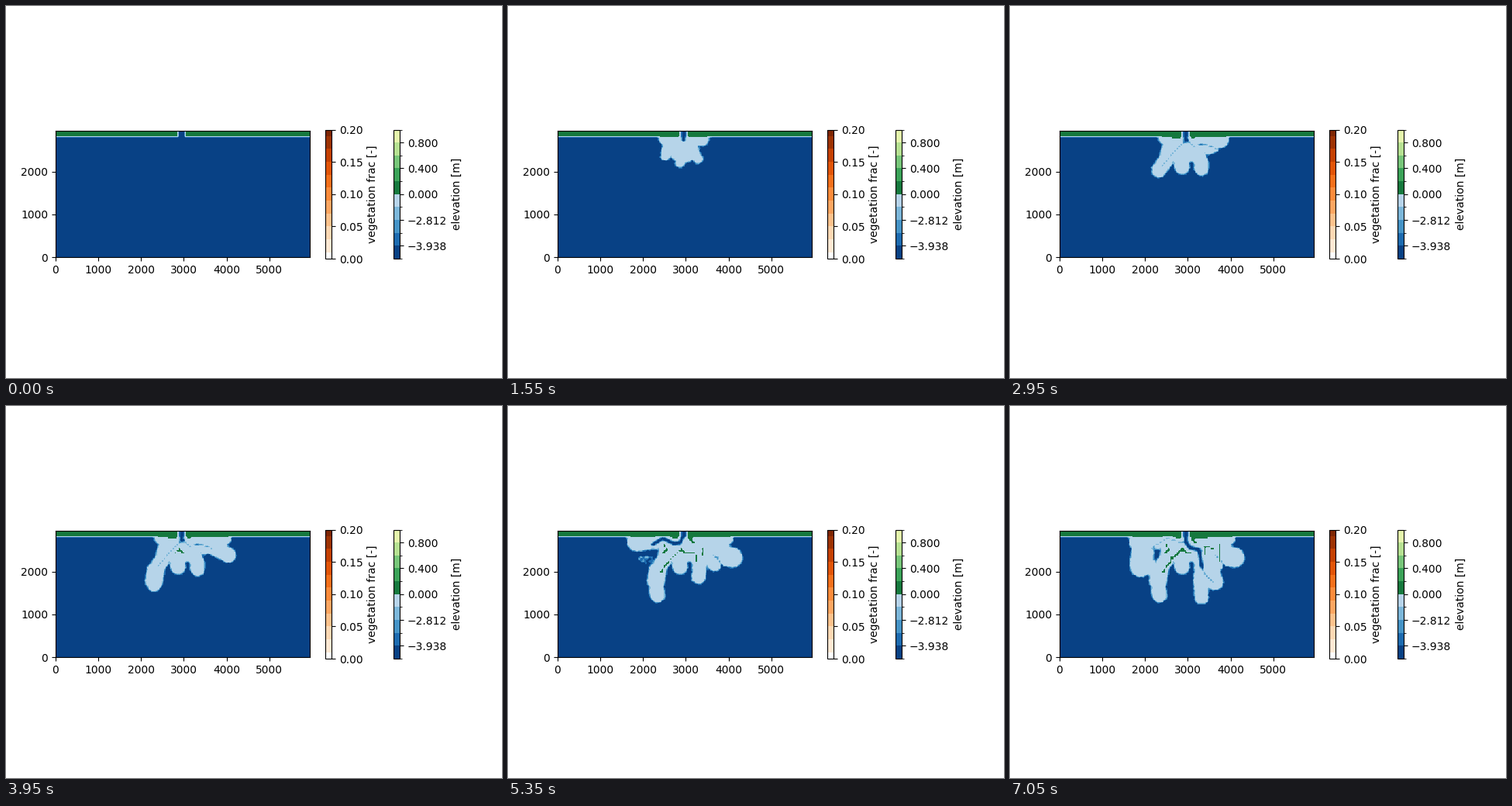
A matplotlib script that plays this animation: 640 by 480 pixels, repeating every 7100 ms.

```python
import matplotlib.pyplot as plt
import numpy as np
from matplotlib.animation import FuncAnimation
from matplotlib.cm import ScalarMappable
from matplotlib.colors import BoundaryNorm, ListedColormap, Normalize

W, H, DPI = 640, 480, 100
FRAMES, STEP = 142, 50
NX, NY = 120, 60
LEFT, TOP, WIDTH, HEIGHT = 64, 161.4, 328, 162.6
SEA, SHELF, LAND = -5, -0.35, 0.1

# Cell centres in stage pixels
X, Y = np.meshgrid(LEFT + (np.arange(NX) + 0.5) * WIDTH / NX,
                   TOP + (np.arange(NY) + 0.5) * HEIGHT / NY)
ROUGH = np.random.default_rng(4).normal(0, 1, (NY, NX))

# Delta arms: radius, then the tip's time and place along its way
WEST = [
    (21, (0, 226, 169), (850, 226, 183)),
    (12, (0, 226, 169), (850, 210, 170), (2200, 202, 170)),
    (11, (850, 206, 182), (2200, 202, 198), (2950, 192, 212),
         (3950, 191, 230), (4600, 193, 244)),
    (13, (3000, 193, 213), (3950, 191, 226)),
    (11, (850, 222, 189), (2200, 222, 208)),
    (14, (4550, 192, 172), (5250, 166, 175)),
    (16, (5300, 172, 180), (6600, 169, 206)),
    (10, (5600, 180, 205), (6600, 192, 222)),
]
EAST = [
    (12, (0, 226, 169), (850, 241, 170), (2200, 253, 171),
         (2950, 272, 173), (3950, 280, 170)),
    (10.5, (850, 240, 185), (2200, 247, 203), (2950, 247, 210),
           (4500, 247, 211), (5250, 246, 219), (6700, 247, 247)),
    (11, (2500, 255, 182), (2950, 262, 180), (3950, 287, 193)),
    (14, (3950, 284, 195), (4600, 290, 196)),
    (9, (3950, 258, 196), (4600, 267, 206)),
    (12.5, (5800, 258, 212), (7000, 264, 227)),
]

# Channels: start, end, half width, depth, course
CHANNELS = [
    (0, 4300, 3.2, 5, [(226.6, 160), (226.6, 173)]),
    (2500, 4700, 1.9, 2.7, [(228, 173), (236, 181), (252, 179), (266, 184)]),
    (2500, 4500, 1.8, 2.5, [(225, 176), (213, 187), (197, 206)]),
    (4400, 6000, 2.9, 4.8, [(226, 168), (222, 177), (214, 178), (200, 171),
                            (187, 179)]),
    (5700, 9000, 3.1, 4.9, [(227, 160), (227, 176), (232, 183), (244, 186),
                            (247, 206)]),
    (6000, 9000, 1.9, 2.8, [(247, 206), (251, 217), (262, 227)]),
    (5900, 9000, 1.9, 2.5, [(222, 177), (203, 171), (182, 184)]),
]

# Emerged banks: start, half width, course
BANKS = [
    (2200, 1.6, [(233, 169), (236, 171)]),
    (2700, 1.8, [(211, 170), (220, 170)]),
    (3500, 1.6, [(218, 191), (223, 185), (228, 190)]),
    (4600, 1.5, [(197, 215), (206, 203), (218, 190)]),
    (4600, 1.4, [(228, 189), (242, 191), (242, 201)]),
    (4600, 1.5, [(202, 180), (205, 186), (198, 191)]),
    (4700, 2, [(232, 168), (240, 177)]),
    (4700, 1.3, [(251, 193), (251, 185)]),
    (6000, 2.2, [(232, 170), (254, 170)]),
    (6000, 2.2, [(207, 198), (222, 186)]),
    (6100, 1.5, [(252, 181), (263, 185)]),
    (6200, 1.4, [(270, 179), (271, 201)]),
]


def line_dist(pts):
    best = np.full(X.shape, 1e9)
    for (ax, ay), (bx, by) in zip(pts, pts[1:]):
        dx, dy = bx - ax, by - ay
        size = max(dx * dx + dy * dy, 1e-9)
        s = np.clip(((X - ax) * dx + (Y - ay) * dy) / size, 0, 1)
        best = np.minimum(best, np.hypot(X - ax - s * dx, Y - ay - s * dy))
    return best


def ramp(t, start, end):
    return float(np.clip((t - start) / (end - start), 0, 1))


def arm_reach(t, radius, *keys):
    """Distance inside one arm, which swells while its tip moves on."""
    pts = [keys[0][1:]]
    for (ta, ax, ay), (tb, bx, by) in zip(keys, keys[1:]):
        if t > ta:
            u = ramp(t, ta, tb) ** (0.55 if tb <= 2200 else 1)
            pts.append((ax + (bx - ax) * u, ay + (by - ay) * u))
    return radius * ramp(t, keys[0][0], keys[1][0]) ** 0.5 - line_dist(pts)


channels = [(a, b, d * np.exp(-(line_dist(c) / w) ** 2))
            for a, b, w, d, c in CHANNELS]
banks = [(a, w, line_dist(c)) for a, w, c in BANKS]
shoal = line_dist([(172, 198), (183, 199)]) < 5


def elevation(t):
    z = np.full((NY, NX), float(SEA))
    if t > 0:
        phi = np.max([arm_reach(t, *a) for a in WEST + EAST if t > a[1][0]],
                     axis=0)
        z += (SHELF - SEA) * np.clip((phi + 0.4 * ROUGH + 0.6) / 4.5, 0, 1)
        if t > 4800:
            z = np.where(shoal, np.maximum(z, 0.7 * ROUGH - 3.6), z)
        for a, w, d in banks:
            if t >= a:
                z[d < w * min(1, 0.5 + (t - a) / 400)] = LAND
        for a, b, cut in channels:
            z -= cut * ramp(t, a, a + 250) * (1 - ramp(t, b - 400, b))
    z = np.clip(z, SEA, LAND)
    z[:3] = LAND
    z[:3, 58:61] = SEA
    if t > 0:
        z[:3, [58, 60]] = -3.7
    return z


def box(x, y, w, h):
    return [x / W, 1 - (y + h) / H, w / W, h / H]


def add_bar(x, mappable, **kw):
    return fig.colorbar(mappable, cax=fig.add_axes(box(x, 159.5, 8.3, 166.5)),
                        **kw)


levels = np.r_[np.linspace(-4.5, -2.25, 5), np.linspace(0, 1, 6)]
relief = ListedColormap(np.vstack([plt.cm.Blues(np.linspace(0.93, 0.3, 5)),
                                   plt.cm.YlGn(np.linspace(0.8, 0.2, 5))]))
norm = BoundaryNorm(levels, relief.N)
plants = ListedColormap(np.vstack([np.ones(4),
                                   plt.cm.Oranges(np.linspace(0.1, 1, 10))]))

fig = plt.figure(figsize=(W / DPI, H / DPI), dpi=DPI)
ax = fig.add_axes(box(LEFT, TOP, WIDTH, HEIGHT))
img = ax.imshow(elevation(0), cmap=relief, norm=norm, aspect="auto",
                extent=[0, 5950, 0, 2950], interpolation="hanning")
ax.set_xticks(range(0, 6000, 1000))
ax.set_yticks(range(0, 3000, 1000))

veg = add_bar(412, ScalarMappable(Normalize(-0.01, 0.21), plants))
veg.ax.set_ylim(0, 0.2)
marks = np.linspace(0, 0.2, 5)
veg.set_ticks(marks, labels=[f"{v:.2f}" for v in marks])
veg.set_label("vegetation frac [-]")

elev = add_bar(499.7, ScalarMappable(norm, relief), spacing="uniform")
marks = levels[1::2]
elev.set_ticks(marks, labels=[f"{v:.3f}".replace("-", "\u2212") for v in marks])
elev.set_label("elevation [m]")


def draw(i):
    img.set_data(elevation(i * STEP))
    return [img]


anim = FuncAnimation(fig, draw, frames=FRAMES, interval=STEP,
                     init_func=lambda: draw(0), repeat=True, repeat_delay=0)
plt.show()
```
